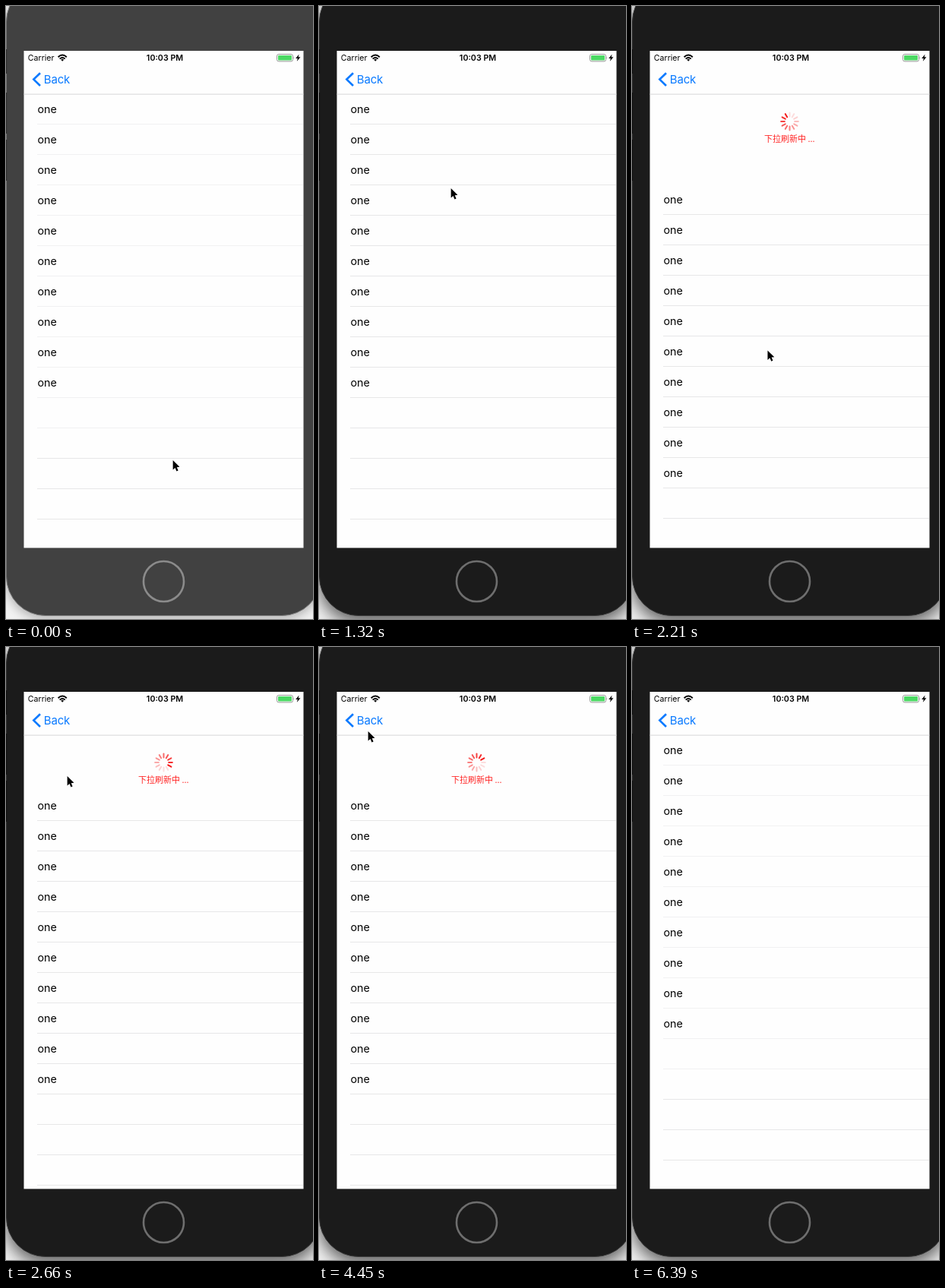
An HTML page for the animation above (7.62 s loop, 404x807 px).

```html
<!DOCTYPE html>
<html lang="en">
<head>
<meta charset="utf-8">
<title>Pull to refresh</title>
<style>
  html, body { margin: 0; width: 100%; height: 100%; overflow: hidden; background: #f2f2f2; }
  #stage { position: relative; width: 404px; height: 807px; overflow: hidden; }
  #stage { --case: #414141; --ring: #8b8b8b; --key: #303030; --rim: #777; --shade: 0 4px 14px rgba(0,0,0,.28); }
  #stage.active { --case: #1b1b1b; --ring: #6e6e6e; --key: #121212; --rim: #333; --shade: 0 9px 22px rgba(0,0,0,.62); }
  #phone {
    position: absolute; left: 0; top: -31px; width: 415px; height: 834px; box-sizing: border-box;
    border: 1px solid var(--rim); border-radius: 52px; background: var(--case); box-shadow: var(--shade);
  }
  svg { position: absolute; left: 0; top: 0; }
  text { font-family: Inter, "Open Sans", sans-serif; }
  .row { font-size: 14.3px; }
  .hint { font: 11px "Noto Sans CJK SC", "Noto Sans CJK", "Noto Sans", sans-serif; fill: #ff2424; }
  #keys { fill: var(--key); }
  #home { fill: none; stroke: var(--ring); stroke-width: 2.6; }
</style>
</head>
<body>
<div id="stage">
  <div id="phone"></div>
  <svg width="404" height="807" viewBox="0 0 404 807">
    <defs>
      <clipPath id="view"><rect x="24" y="117" width="367" height="596"/></clipPath>
    </defs>
    <g id="keys">
      <rect y="57" width="1.2" height="32"/>
      <rect y="114" width="1.2" height="54"/>
      <rect y="176" width="1.2" height="54"/>
    </g>
    <circle id="home" cx="207.5" cy="757.5" r="26.5"/>
    <rect x="23.5" y="59" width="368" height="654.4" fill="#fefefe"/>

    <g clip-path="url(#view)">
      <g id="refresh">
        <g id="spinner" stroke="#f51a1a" stroke-width="2" stroke-linecap="round"></g>
        <text id="hint" class="hint" x="174" y="179" xml:space="preserve">下拉刷新中 ...</text>
      </g>
      <g id="list">
        <rect x="24" y="116" width="367" height="640" fill="#fefefe"/>
      </g>
    </g>

    <rect x="23.5" y="115.6" width="368" height="1" fill="#d6d6d8"/>
    <text x="28.8" y="72.2" font-size="10.6">Carrier</text>
    <text x="209" y="72.3" font-size="10.7" font-weight="600" text-anchor="middle">10:03 PM</text>
    <g fill="none" stroke="#000" stroke-width="1.9">
      <path d="M68.6 67.2Q74.2 61.8 79.8 67.2"/>
      <path d="M70.7 69.6Q74.2 66.2 77.7 69.6"/>
      <path d="M72.3 70.7Q74.2 69 76.1 70.7L74.2 72.8Z" fill="#000" stroke="none"/>
    </g>
    <rect x="356.5" y="63.5" width="21" height="9.4" rx="2.4" fill="#fff" stroke="#8c8c8c" stroke-width=".9"/>
    <rect x="358" y="65" width="18" height="6.4" rx="1" fill="#4cd964"/>
    <path d="M378.6 66.5q1.5 1.7 0 3.4z" fill="#8c8c8c"/>
    <path d="M385.6 63.6L381.2 69H383.8L382.9 72.8L387.4 67.3H384.7Z"/>
    <path d="M45 88.2L36.4 96.6L45 105" fill="none" stroke="#0a7aff" stroke-width="2.7"/>
    <text x="49.8" y="101.8" font-size="15" letter-spacing="-.2" fill="#0a7aff">Back</text>

    <g id="cursor">
      <g transform="scale(.93)">
        <path id="arrow" d="M.7 1.2V14.6L3.8 11.8L5.9 16.6L8.2 15.6L6.2 10.9L10.2 10.6Z"
          stroke="#fff" stroke-width="1.6" paint-order="stroke"/>
      </g>
    </g>
  </svg>
</div>
<script>
const LOOP = 7620, STEP = 148.6, LEAD = 18;
const PRESS = 1319, SPIN = 1690, RELEASE = 2062, DONE = 4690, LEAVE = 5920;
const GRAB_Y = 239, RESIST = .487, HOLD = 73;

// Pointer stops: time, x, y
const stops = [
  [0, 219, 597], [1000, 166, 238], [1171, 173, GRAB_Y], [PRESS, 173, GRAB_Y], [1695, 196, 505],
  [RELEASE, 196, 505], [2657, 80, 169], [3250, 64, 128], [4440, 64, 110], [5332, 68, 105], [5777, 249, 746]
];

const $ = id => document.getElementById(id);
const clamp = v => Math.max(0, Math.min(1, v));
const mix = (a, b, p) => a + (b - a) * p;
function ease(t, from, to) {
  const p = clamp((t - from) / (to - from));
  return p * p * (3 - 2 * p);
}

function svg(parent, tag, attrs, text = '') {
  const el = document.createElementNS('http://www.w3.org/2000/svg', tag);
  for (const k in attrs) el.setAttribute(k, attrs[k]);
  el.textContent = text;
  return parent.appendChild(el);
}

function pointer(t) {
  const i = Math.max(1, stops.findIndex(s => s[0] > t));
  const end = t >= stops[stops.length - 1][0] ? stops.length - 1 : i;
  const [t0, x0, y0] = stops[end - 1], [t1, x1, y1] = stops[end];
  const p = ease(t, t0, t1);
  return [mix(x0, x1, p), mix(y0, y1, p)];
}

// The list follows the drag with resistance, settles under the spinner, then closes
function pull(t) {
  if (t < PRESS) return 0;
  const drag = RESIST * (pointer(Math.min(t, RELEASE))[1] - GRAB_Y);
  const open = mix(drag, HOLD, ease(t, RELEASE, RELEASE + 540));
  return open * (1 - ease(t, DONE, DONE + 480));
}

const lines = [], spokes = [];
for (let i = 0; i < 15; i++) {
  const y = 116 + i * 40;
  if (i < 10) svg($('list'), 'text', { class: 'row', x: 41.4, y: y + 25 }, 'one');
  lines.push(svg($('list'), 'rect', { x: 41, y: y + 39, width: 350, height: 1 }));
}
for (let i = 0; i < 12; i++)
  spokes.push(svg($('spinner'), 'path', { d: 'M0-6.6V-11.4', transform: `rotate(${i * 30})` }));

function draw(t) {
  const [x, y] = pointer(t), drop = pull(t);
  $('stage').classList.toggle('active', t >= PRESS);
  $('cursor').setAttribute('transform', `translate(${x} ${y})`);
  $('cursor').style.display = t < LEAVE ? '' : 'none';

  $('list').setAttribute('transform', `translate(0 ${Math.round(drop)})`);
  lines.forEach((line, i) => line.setAttribute('fill', drop || i > 10 ? '#e7e7e8' : '#f1f1f2'));

  const fade = 1 - clamp((t - DONE) / 350);
  $('refresh').style.display = drop ? '' : 'none';
  $('refresh').style.opacity = fade;
  $('hint').style.opacity = t < SPIN ? clamp(drop / 150) : 1;
  $('spinner').setAttribute('transform', `translate(207.5 152) scale(${fade})`);
  const head = Math.floor(4.7 + (t - 2657) * .012 + 24) % 12;
  spokes.forEach((s, i) => {
    const age = (head - i + 12) % 12;
    s.style.opacity = t < SPIN ? clamp(drop / 11.5 - i) : Math.max(.14, 1 - age * .09);
  });
}

// Poses are held for one step each
function tick(now) {
  const k = Math.floor((now % LOOP + LEAD) / STEP);
  draw(Math.max(0, k * STEP - LEAD));
  requestAnimationFrame(tick);
}
tick(performance.now());
</script>
</body>
</html>
```
